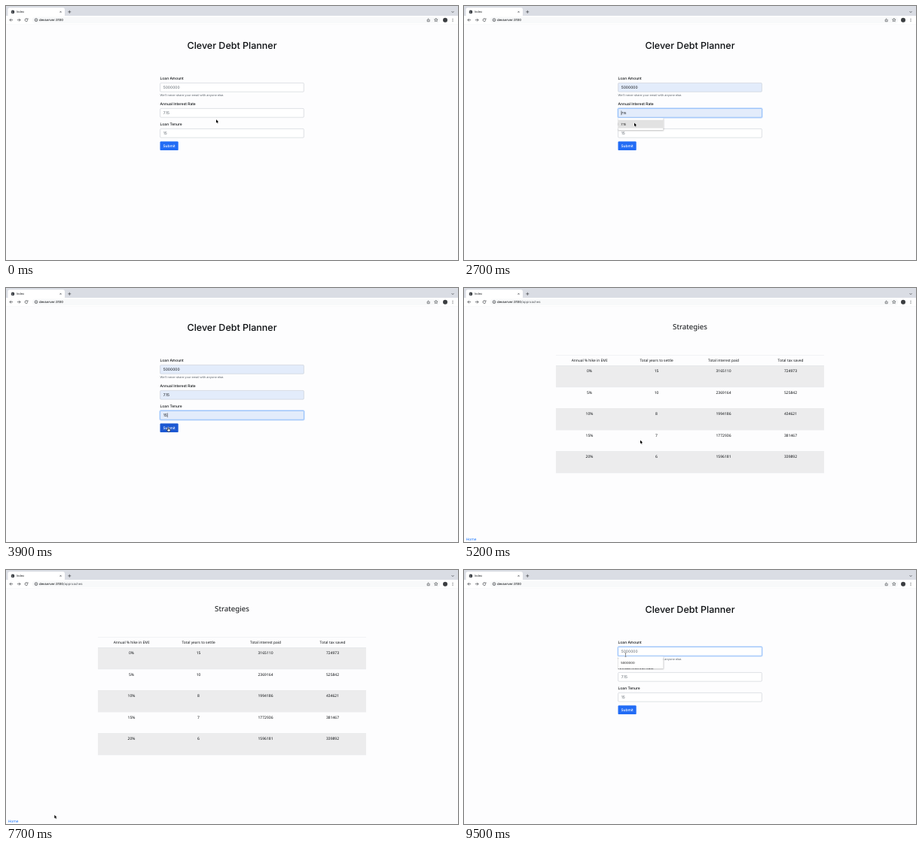
Recreate the animation shown at these times as an HTML page with a canvas. Size 600 by 338 pixels, loop 10 s.

```html
<!DOCTYPE html>
<html lang="en">
<head>
<meta charset="utf-8">
<title>Index</title>
<style>
  html, body { margin: 0; width: 100%; height: 100%; overflow: hidden; background: #fdfdfe; }
  canvas { display: block; width: 600px; height: 338px; }
</style>
</head>
<body>
<canvas id="stage"></canvas>
<script>
const LOOP = 10000, STEP = 100;
const SANS = 'Inter, "Liberation Sans", sans-serif';
const TABLE_FONT = '"Noto Sans", "Open Sans", sans-serif';
const INK = '#0c0f12', GRAY = '#5a626a', ICON = '#3f4347', BLUE = '#226cf5';
const HOST = 'devserver:3100';
const SUBMIT_AT = 5100, HOME_AT = 8200, REFOCUS_AT = 9000;

// Each field: vertical centre, then when it opens, previews, is picked and loses focus.
const FIELDS = [
  { label: 'Loan Amount', value: '5000000', y: 108.3, open: 1500, preview: 1900, pick: 2000, blur: 2500 },
  { label: 'Annual Interest Rate', value: '7.15', y: 142.3, open: 2500, preview: 2700, pick: 2800, blur: 3200 },
  { label: 'Loan Tenure', value: '15', y: 169.3, open: 3200, preview: 3500, pick: 3600, blur: SUBMIT_AT }
];
const FIELD = { x: 204.6, w: 190.8, h: 11.8 };
const BUTTON = { x: 204.5, y: 180.2, w: 24.2, h: 11.9 };

const ROWS = [
  ['0%', '15', '3165110', '724973'],
  ['5%', '10', '2369164', '525842'],
  ['10%', '8', '1994186', '434621'],
  ['15%', '7', '1772936', '381467'],
  ['20%', '6', '1596181', '339892']
];
const HEADERS = ['Annual % hike in EMI', 'Total years to settle', 'Total interest paid', 'Total tax saved'];

// Pointer path: time, x, y
const PATH = [
  [0, 279, 151], [800, 279, 151], [1000, 268, 136], [1300, 233, 97], [1500, 229, 108],
  [1800, 228, 114.5], [1900, 226, 120], [2000, 225, 122], [2300, 224, 139], [2500, 225, 142],
  [2700, 226, 155.5], [2900, 225, 158], [3200, 222, 169], [3500, 219, 183], [3600, 218, 184],
  [3900, 215.5, 186], [4300, 215, 187], [5100, 215, 187], [5500, 291, 249], [6900, 291, 249],
  [7300, 71.5, 330], [7400, 71.5, 330], [7500, 90.5, 321.5], [7600, 90.5, 321.5],
  [7900, 12, 335], [8300, 12, 335], [8500, 100, 255], [8700, 222, 126], [8900, 215, 114],
  [9200, 214.5, 113], [10000, 214.5, 113]
];

const canvas = document.getElementById('stage');
const ctx = canvas.getContext('2d');
const ratio = window.devicePixelRatio || 1;
canvas.width = 600 * ratio;
canvas.height = 338 * ratio;
ctx.scale(ratio, ratio);
ctx.lineJoin = 'round';
ctx.textRendering = 'geometricPrecision';

function text(str, x, midY, size, { color = INK, weight = 400, align = 'left', font = SANS } = {}) {
  ctx.font = `${weight} ${size}px ${font}`;
  ctx.fillStyle = color;
  ctx.textAlign = align;
  ctx.fillText(str, x, midY + size * 0.36);
  return ctx.measureText(str).width;
}

function rect(x, y, w, h, color) {
  ctx.fillStyle = color;
  ctx.fillRect(x, y, w, h);
}

function round(x, y, w, h, r, fill, stroke, width = 0.4) {
  ctx.beginPath();
  ctx.roundRect(x, y, w, h, r);
  if (fill) { ctx.fillStyle = fill; ctx.fill(); }
  if (stroke) { ctx.strokeStyle = stroke; ctx.lineWidth = width; ctx.stroke(); }
}

function line(points, color = ICON, width = 0.7) {
  ctx.beginPath();
  points.forEach(([x, y]) => ctx.lineTo(x, y));
  ctx.strokeStyle = color;
  ctx.lineWidth = width;
  ctx.stroke();
}

function disc(x, y, r, fill) {
  ctx.beginPath();
  ctx.arc(x, y, r, 0, Math.PI * 2);
  ctx.fillStyle = fill;
  ctx.fill();
}

function ring(x, y, r, from = 0, to = Math.PI * 2) {
  ctx.beginPath();
  ctx.arc(x, y, r, from, to);
  ctx.strokeStyle = ICON;
  ctx.lineWidth = 0.7;
  ctx.stroke();
}

function star(x, y, r) {
  const points = Array.from({ length: 11 }, (_, i) => {
    const a = -Math.PI / 2 + i * Math.PI / 5, d = i % 2 ? r * 0.45 : r;
    return [x + d * Math.cos(a), y + d * Math.sin(a)];
  });
  line(points, ICON, 0.6);
}

function drawBrowser(onTable) {
  rect(0, 0, 600, 13, '#dadde4');
  rect(0, 13, 600, 11.4, '#fff');
  round(2.5, 2.3, 75.5, 12, 2.5, '#fff');
  rect(0, 24.2, 600, 0.3, '#eceef0');
  disc(9, 7.9, 2.3, '#3a3e43');
  line([[7.6, 7.2], [8.9, 8.2], [8.5, 9.4]], '#dfe1e3', 0.5);
  text('Index', 13.8, 7.9, 4, { color: '#24272a' });
  line([[71.6, 6.9], [73.4, 8.7]]);
  line([[73.4, 6.9], [71.6, 8.7]]);
  line([[82.3, 7.8], [86.3, 7.8]]);
  line([[84.3, 5.8], [84.3, 9.8]]);
  line([[591.6, 7.2], [593, 8.6], [594.4, 7.2]], ICON, 0.8);

  line([[9.1, 18.6], [5, 18.6]]);
  line([[6.9, 16.6], [4.9, 18.6], [6.9, 20.6]]);
  line([[14.9, 18.6], [19, 18.6]]);
  line([[17.1, 16.6], [19.1, 18.6], [17.1, 20.6]]);
  ring(27, 18.6, 1.9, 0.3, 5.5);
  line([[29, 16.4], [29, 18], [27.4, 18]]);

  round(34.5, 14.5, 542, 8.5, 4.2, '#f8f9fa');
  ring(40, 18.6, 1.9);
  line([[40, 17.7], [40, 19.7]], ICON, 0.6);
  const hostWidth = text(HOST, 44, 18.7, 4.3, { color: '#15181b', weight: 500 });
  if (onTable) text('/approaches', 44 + hostWidth, 18.7, 4.3, { color: '#4d5156' });

  line([[559.8, 18], [559.2, 18], [559.2, 20.7], [562.2, 20.7], [562.2, 18], [561.6, 18]], ICON, 0.6);
  line([[560.7, 19.4], [560.7, 16.4]], ICON, 0.6);
  star(570.8, 18.7, 2.4);
  disc(583, 18.7, 3, '#3b3e41');
  for (const dy of [-1.6, 0, 1.6]) disc(593, 18.7 + dy, 0.5, ICON);
}

function fieldState(field, index, t) {
  const again = t >= HOME_AT;
  const open = again ? (index === 0 ? REFOCUS_AT : Infinity) : field.open;
  const picked = !again && t >= field.pick;
  const focused = t >= open && (again || t < field.blur);
  return {
    focused, picked,
    preview: !again && t >= field.preview && !picked,
    listed: focused && !picked,
    caret: focused && Math.floor((t - (picked ? field.pick : open)) / 500) % 2 === 0
  };
}

function drawField(field, s) {
  const { x, w, h } = FIELD, top = field.y - h / 2;
  const filled = s.picked || s.preview;
  if (s.focused) round(x - 1.2, top - 1.2, w + 2.4, h + 2.4, 2, '#c6dcfd');
  round(x, top, w, h, 1.2, filled ? '#e3ecfb' : '#fff', s.focused ? '#6fabf6' : '#bcc3cb', s.focused ? 0.6 : 0.5);
  const width = text(field.value, 208.7, field.y + 0.1, s.preview ? 4.1 : 5,
    { color: filled ? INK : GRAY });
  if (s.caret) rect(s.picked ? 208.9 + width : 208.7, field.y - 2.9, 0.5, 5.8, '#111');
}

function drawList(field, hovered) {
  const top = field.y + 6.8;
  ctx.save();
  ctx.shadowColor = 'rgba(0,0,0,.28)';
  ctx.shadowBlur = 1.8 * ratio;
  ctx.shadowOffsetY = 0.4 * ratio;
  rect(205, top, 59.5, 16, '#fff');
  ctx.restore();
  if (hovered) rect(205, top + 2.5, 59.5, 11, '#e2e2e2');
  text(field.value, 208.2, top + 7.9, 4.2, { color: '#111' });
}

function inside(p, { x, y, w, h }) {
  return p.x >= x && p.x <= x + w && p.y >= y && p.y <= y + h;
}

function drawForm(t, pointer) {
  text('Clever Debt Planner', 300, 52.6, 12.5, { weight: 500, align: 'center' });
  const states = FIELDS.map((field, i) => fieldState(field, i, t));
  FIELDS.forEach((field, i) => {
    text(field.label, 204.6, field.y - 11.9, 4.9, { weight: 500 });
    drawField(field, states[i]);
  });
  text("We'll never share your email with anyone else.", 204.6, 118.5, 3.9, { color: GRAY });
  const { x, y, w, h } = BUTTON;
  round(x, y, w, h, 1.2, inside(pointer, BUTTON) ? '#1c58d2' : BLUE);
  text('Submit', x + w / 2, 186.3, 4.9, { color: '#fff', weight: 500, align: 'center' });
  states.forEach((s, i) => { if (s.listed) drawList(FIELDS[i], s.preview); });
}

function drawTable() {
  text('Strategies', 300, 51, 9.75, { weight: 500, align: 'center', font: TABLE_FONT });
  const cells = (row, y, size) => row.forEach((cell, i) =>
    text(cell, 166.5 + 89 * i, y, size, { align: 'center', font: TABLE_FONT }));
  rect(122, 89.4, 356, 0.4, '#dee2e6');
  cells(HEADERS, 96.4, 4.85);
  ROWS.forEach((row, i) => {
    const top = 103.2 + 28.55 * i;
    if (i % 2 === 0) rect(122, top, 356, 28.55, '#ececed');
    rect(122, top, 356, 0.35, '#dadde0');
    cells(row, top + 7, 5);
  });
  rect(122, 245.9, 356, 0.35, '#dee2e6');
  text('Home', 2.8, 334.4, 4.8, { color: '#0d6efd', font: TABLE_FONT });
}

function drawStatus() {
  round(569.3, 331.8, 32, 8, 1, '#d9dbde');
  text(HOST, 571.2, 335.1, 3.7, { color: '#8b8f94' });
}

function pointerAt(t) {
  const i = PATH.findIndex(([time]) => time > t);
  const [t0, x0, y0] = PATH[i - 1], [t1, x1, y1] = PATH[i];
  const k = (t - t0) / (t1 - t0);
  return { x: x0 + (x1 - x0) * k, y: y0 + (y1 - y0) * k };
}

function pointerKind(p, onTable) {
  if (p.y > 331 && p.x < 17) return 'hand';
  if (onTable) return 'arrow';
  if (inside(p, BUTTON)) return 'hand';
  return FIELDS.some(f => inside(p, { ...FIELD, y: f.y - FIELD.h / 2 })) ? 'beam' : 'arrow';
}

function drawPointer(p, kind) {
  ctx.save();
  ctx.translate(p.x, p.y);
  if (kind === 'beam') {
    const bars = [[[0, -2.3], [0, 2.3]], [[-0.9, -2.5], [0, -2.2], [0.9, -2.5]], [[-0.9, 2.5], [0, 2.2], [0.9, 2.5]]];
    bars.forEach(b => line(b, '#fff', 1));
    bars.forEach(b => line(b, '#222', 0.5));
  } else if (kind === 'hand') {
    const shape = new Path2D('M-.6 0Q0-.7.5 0V1.7L2.4 2.2Q2.9 2.4 2.7 3.2L2.1 5H-.8L-2.3 2.8Q-2.2 2-1.4 2.5L-.6 3.2Z');
    ctx.fillStyle = '#fff';
    ctx.strokeStyle = '#111';
    ctx.lineWidth = 0.6;
    ctx.fill(shape);
    ctx.stroke(shape);
  } else {
    const shape = new Path2D('M0 0V4.6L1.05 3.6L1.75 5.2L2.5 4.9L1.8 3.3H3.2Z');
    ctx.strokeStyle = '#fff';
    ctx.lineWidth = 0.7;
    ctx.stroke(shape);
    ctx.fillStyle = '#000';
    ctx.fill(shape);
  }
  ctx.restore();
}

function draw(t) {
  const onTable = t >= SUBMIT_AT && t < HOME_AT;
  const pointer = pointerAt(t);
  rect(0, 0, 600, 338, '#fdfdfe');
  if (onTable) drawTable(); else drawForm(t, pointer);
  drawBrowser(onTable);
  if (t >= 7900 && t < 8600) drawStatus();
  drawPointer(pointer, pointerKind(pointer, onTable));
}

function tick() {
  const t = performance.now() % LOOP;
  draw(Math.floor(t / STEP) * STEP);
  requestAnimationFrame(tick);
}
tick();
</script>
</body>
</html>
```
